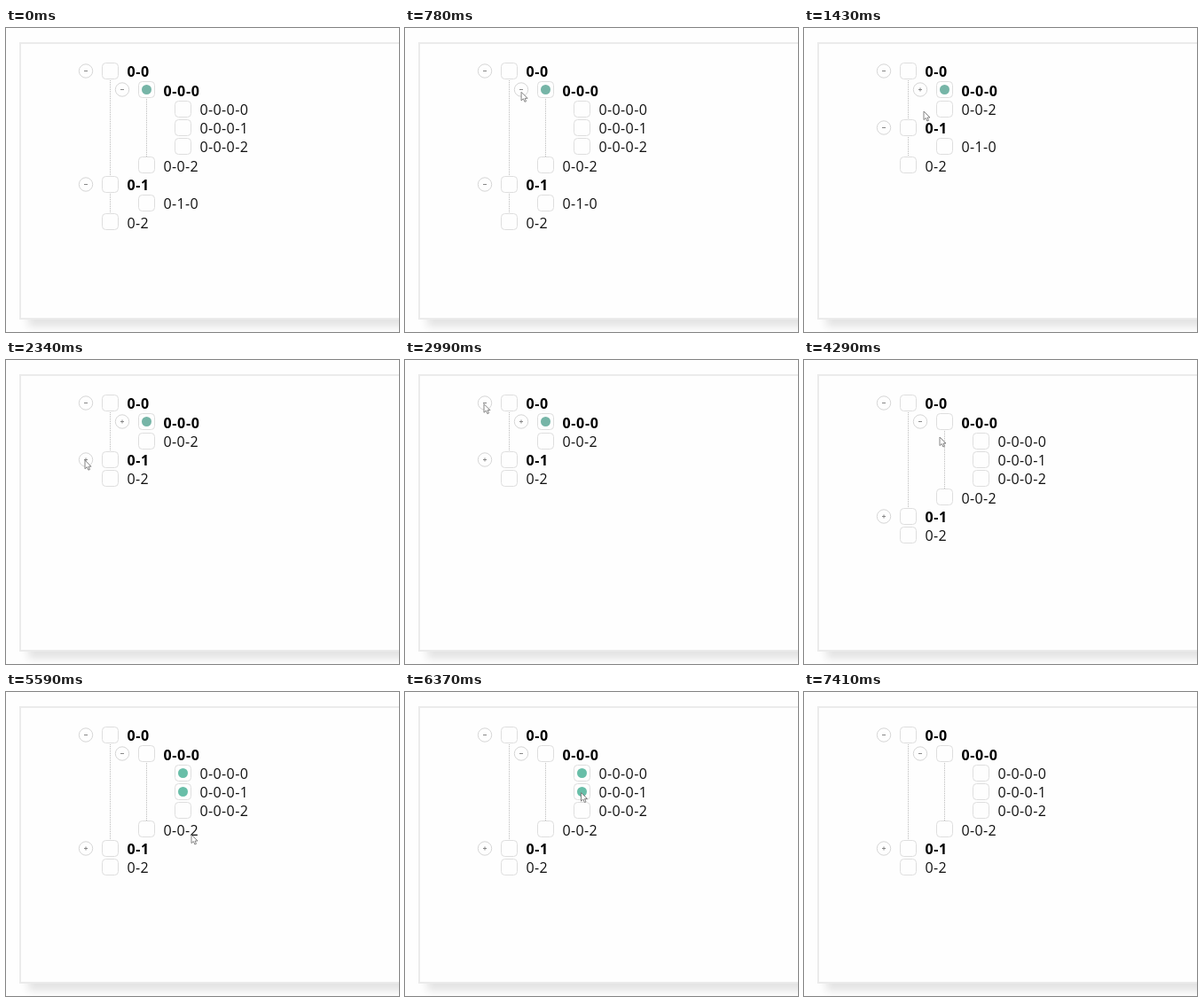
Animation of 443 by 343 pixels, one loop 7.8 s. Source, as an HTML page:

```html
<!DOCTYPE html>
<html lang="en">
<head>
<meta charset="utf-8">
<title>Tree</title>
<style>
  html, body { margin: 0; width: 100%; height: 100%; overflow: hidden; background: #fefefe; }
  .card {
    position: absolute; left: 15px; right: 0; top: 16px; height: 309px;
    border: 2px solid #ebebeb; border-right: 0; background: #fefefe;
    box-shadow: 10px 8px 9px rgba(0, 0, 0, .11);
  }
  svg { position: absolute; left: 0; top: 0; width: 100%; height: 100%; }
  text { font: 16px "Open Sans", "Noto Sans", sans-serif; letter-spacing: .4px; fill: #111; }
  .parent { font-weight: 700; letter-spacing: .7px; fill: #000; }
  .box { fill: #fefefe; stroke: #dedede; }
  .ring { fill: #fefefe; stroke: #d6d6d6; }
  .sign { stroke: #888; }
  .line { stroke: #bbb; stroke-dasharray: 1 1; }
  #cursor { fill: #fff; stroke: #777; stroke-width: .9; stroke-linejoin: round; }
</style>
</head>
<body>
<div class="card"></div>
<svg>
  <g id="tree"></g>
  <path id="cursor" d="M0 0V9.6L2.3 7.5L3.9 11L5.5 10.3L4 7H7Z"/>
</svg>
<script>
const LOOP = 7800, STEP = 130;
const REST = 100, LEAD = 130, TRAVEL = 700;
const treeEl = document.getElementById('tree');
const cursorEl = document.getElementById('cursor');

const node = (id, ...kids) => ({ id, kids });
const roots = [
  node('0-0',
    node('0-0-0', node('0-0-0-0'), node('0-0-0-1'), node('0-0-0-2')),
    node('0-0-2')),
  node('0-1', node('0-1-0')),
  node('0-2')
];

// What the pointer does: pass a point, fold a branch or check a box
const pass = (time, x, y) => ({ time, x, y });
const fold = (time, id) => ({ time, id, kind: 'fold' });
const check = (time, id) => ({ time, id, kind: 'check' });
const script = [
  pass(130, 205, 195),
  fold(1040, '0-0-0'),
  pass(1430, 135, 94),
  fold(2210, '0-1'),
  fold(3380, '0-0'),
  fold(3640, '0-0'),
  fold(4160, '0-0-0'),
  pass(4290, 153, 87),
  check(4810, '0-0-0-0'),
  check(5200, '0-0-0-1'),
  pass(5590, 209, 161),
  check(6760, '0-0-0-1'),
  check(7020, '0-0-0-0'),
  pass(7280, 228, 325)
];

const flip = (set, id) => set.delete(id) || set.add(id);

// Folding a branch also drops the checks below it
function stateAt(t) {
  const closed = new Set(), checked = new Set(['0-0-0']);
  for (const { time, id, kind } of script) {
    if (time > t || !kind) continue;
    flip(kind === 'fold' ? closed : checked, id);
    if (kind === 'fold')
      for (const c of checked) if (c.startsWith(id + '-')) checked.delete(c);
  }
  return { closed, checked };
}

function layout(closed) {
  const rows = [];
  const walk = (nodes, depth) => {
    let prev = null;
    for (const n of nodes) {
      const y = Math.floor(48.6 + 21.25 * rows.length) + .5;
      const base = Math.round(55.2 + 21.3 * rows.length);
      const row = { n, x: 117.5 + 41 * depth, y, base, prev };
      rows.push(row);
      prev = row;
      if (!closed.has(n.id)) walk(n.kids, depth + 1);
    }
  };
  walk(roots, 0);
  return rows;
}

const toggleX = x => x - 27.5;

function drawRow({ n, x, y, base, prev }, { closed, checked }) {
  const branch = n.kids.length > 0;
  let out = `<rect class="box" x="${x - 9}" y="${y - 9}" width="18" height="18" rx="4"/>`;
  if (prev && y - prev.y > 30)
    out += `<path class="line" d="M${x} ${prev.y + 10.5}V${y - 9.5}"/>`;
  if (checked.has(n.id))
    out += `<circle cx="${x}" cy="${y}" r="5.5" fill="${branch ? '#76b5a7' : '#68bea8'}"/>`;
  if (branch) {
    const cx = toggleX(x);
    const plus = closed.has(n.id) ? `M${cx} ${y - 2}v4` : '';
    out += `<circle class="ring" cx="${cx}" cy="${y}" r="7.7"/>` +
      `<path class="sign" d="M${cx - 2} ${y}h4${plus}"/>`;
  }
  const cls = branch ? ' class="parent"' : '';
  return out + `<text${cls} x="${x + 18.9}" y="${base}">${n.id}</text>`;
}

// Give every click the place of its control at that moment
for (const s of script) {
  if (!s.kind) continue;
  const row = layout(stateAt(s.time - 1).closed).find(r => r.n.id === s.id);
  s.x = s.kind === 'fold' ? toggleX(row.x) - 1 : row.x - 1;
  s.y = row.y + 1;
}

const smooth = k => k * k * (3 - 2 * k);

function pointerAt(t) {
  const i = script.findIndex(s => s.time >= t);
  if (i < 0 || t < script[0].time) return null;
  const to = script[i], from = script[i - 1] || to;
  const begin = from.time + (from.kind ? REST : 0);
  const end = Math.min(begin + TRAVEL, to.time - (to.kind ? LEAD : 0));
  const k = smooth(Math.min(1, Math.max(0, (t - begin) / Math.max(1, end - begin))));
  return [from.x + (to.x - from.x) * k, from.y + (to.y - from.y) * k];
}

let shown = -1;
function render(ms) {
  const t = Math.floor(ms % LOOP / STEP) * STEP;
  if (t === shown) return;
  shown = t;
  const state = stateAt(t);
  treeEl.innerHTML = layout(state.closed).map(r => drawRow(r, state)).join('');
  const p = pointerAt(t);
  cursorEl.style.display = p ? '' : 'none';
  if (p) cursorEl.setAttribute('transform', `translate(${p[0]} ${p[1]})`);
}

const start = performance.now();
function tick() {
  render(performance.now() - start);
  requestAnimationFrame(tick);
}
tick();
</script>
</body>
</html>
```
